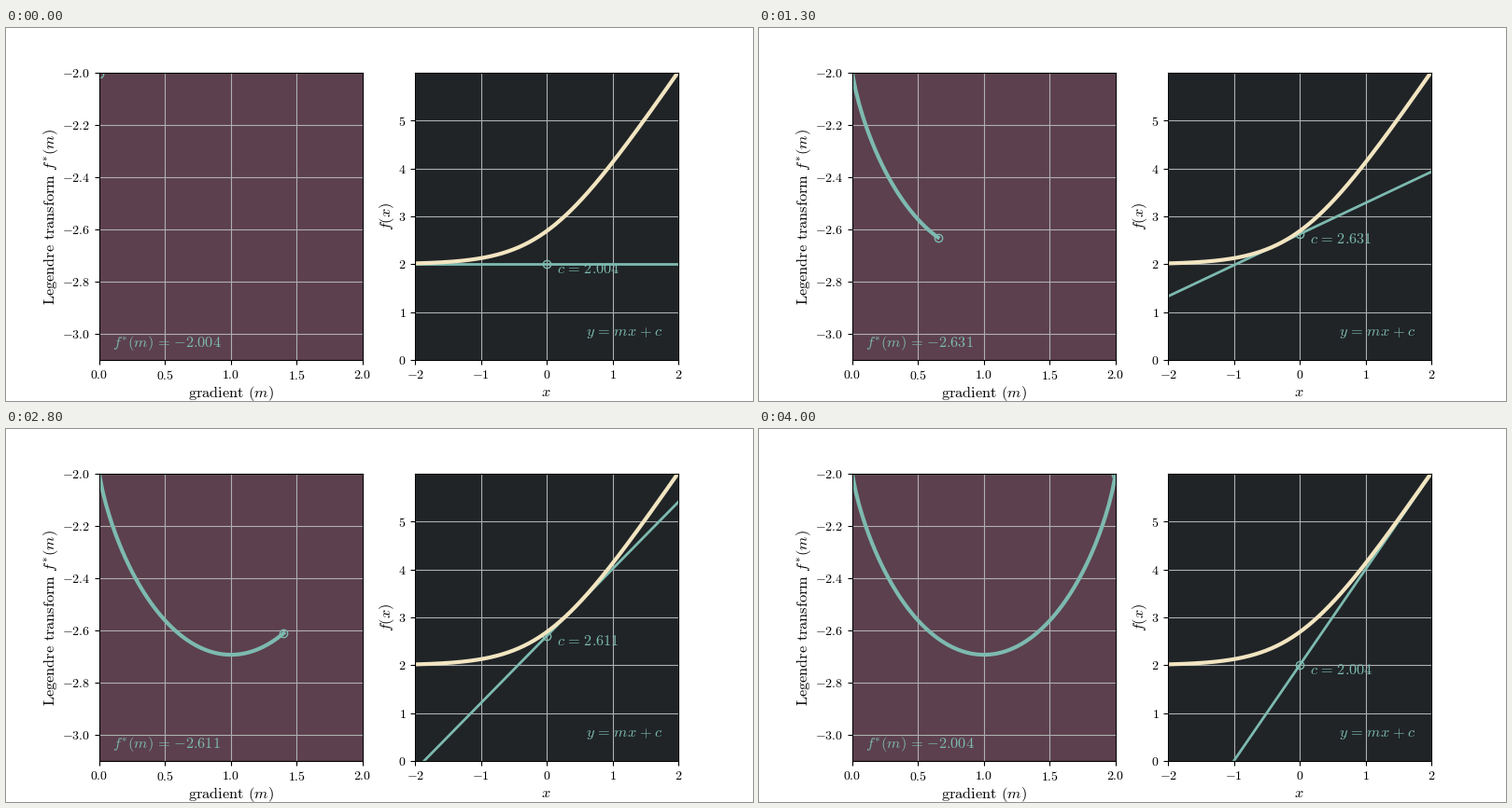
A matplotlib script for the animation above (4.25 s loop, 800 px wide and 400 px high).

```python
import numpy as np
import matplotlib.pyplot as plt
from matplotlib.animation import FuncAnimation

W, H, DPI = 800, 400, 100
STEPS, FRAMES, INTERVAL = 80, 85, 50
TEAL, CREAM, PLUM, SLATE = "#7dbab0", "#f2e5c1", "#5c404d", "#202427"
LABEL = 11.75
EQ = r"\hspace{0.12}=\hspace{0.12}"

plt.rcParams.update({
    "font.family": "Liberation Serif",
    "mathtext.fontset": "cm",
    "font.size": 10,
})


def f(x):
    return 2 + np.log1p(np.exp(2 * x))


def legendre(m):
    """Convex conjugate of f, defined for slopes between 0 and 2."""
    p = np.clip(m, 0.001, 1.999) / 2
    return p * np.log(p) + (1 - p) * np.log(1 - p) - 2


def tick_text(values, digits):
    return ["$" + f"{v:.{digits}f}".replace("-", "{-}") + "$" for v in values]


def style(ax, face, xlim, ylim, xticks, yticks, digits):
    ax.set_facecolor(face)
    ax.set_xticks(xticks, tick_text(xticks, digits))
    ax.set_yticks(yticks, tick_text(yticks, digits))
    ax.set(xlim=xlim, ylim=ylim)
    ax.grid(True)


def label(x, y, text, rotation=0):
    fig.text(x / W, 1 - y / H, text, size=LABEL, rotation=rotation,
             ha="center", va="baseline", rotation_mode="anchor")


def ring(ax):
    return ax.plot([], [], "o", ms=6, mew=1, mfc="none", mec=TEAL)[0]


fig, (left, right) = plt.subplots(1, 2, figsize=(W / DPI, H / DPI), dpi=DPI)
fig.subplots_adjust(left=0.125, right=0.9, bottom=0.11, top=0.88, wspace=0.2)

style(left, PLUM, (0, 2), (-3.1, -2), np.arange(5) / 2,
      -3 + 0.2 * np.arange(6), 1)
style(right, SLATE, (-2, 2), (0, 6), np.arange(-2, 3), np.arange(6), 0)

label(240.9, 396, r"$\mathrm{gradient}\hspace{0.38}(m)$")
label(52, 203,
      r"$\mathrm{Legendre}\hspace{0.38}\mathrm{transform}"
      r"\hspace{0.38}f^{*}(m)$", 90)
label(578.5, 395, r"$x$")
label(411.7, 202, r"$f(x)$", 90)

slopes = np.linspace(0, 2, STEPS + 1)
conj = legendre(slopes)
xs = np.linspace(-2, 2, 200)

trace, = left.plot([], [], color=TEAL, lw=3)
dot = ring(left)
value = left.text(0.1, -3.05, "", color=TEAL, size=LABEL)

tangent, = right.plot([], [], color=TEAL, lw=2)
cut = ring(right)
right.plot(xs, f(xs), color=CREAM, lw=3)
cut_text = right.text(0.15, 0, "", color=TEAL, size=LABEL)
right.text(0.6, 0.5, rf"$y{EQ}mx\hspace{{0.05}}+\hspace{{0.05}}c$",
           color=TEAL, size=LABEL)


def update(i):
    k = min(i, STEPS)
    m, c = slopes[k], -conj[k]
    trace.set_data(slopes[:k + 1], conj[:k + 1])
    dot.set_data([m], [-c])
    value.set_text(rf"$f^{{*}}(m){EQ}{{-}}{c:.3f}$")
    tangent.set_data([-2, 2], [c - 2 * m, c + 2 * m])
    cut.set_data([0], [c])
    cut_text.set_y(c - 0.2)
    cut_text.set_text(rf"$c{EQ}{c:.3f}$")
    return trace, dot, value, tangent, cut, cut_text


anim = FuncAnimation(fig, update, frames=FRAMES, interval=INTERVAL,
                     repeat=True, repeat_delay=0, blit=False)
plt.show()
```
